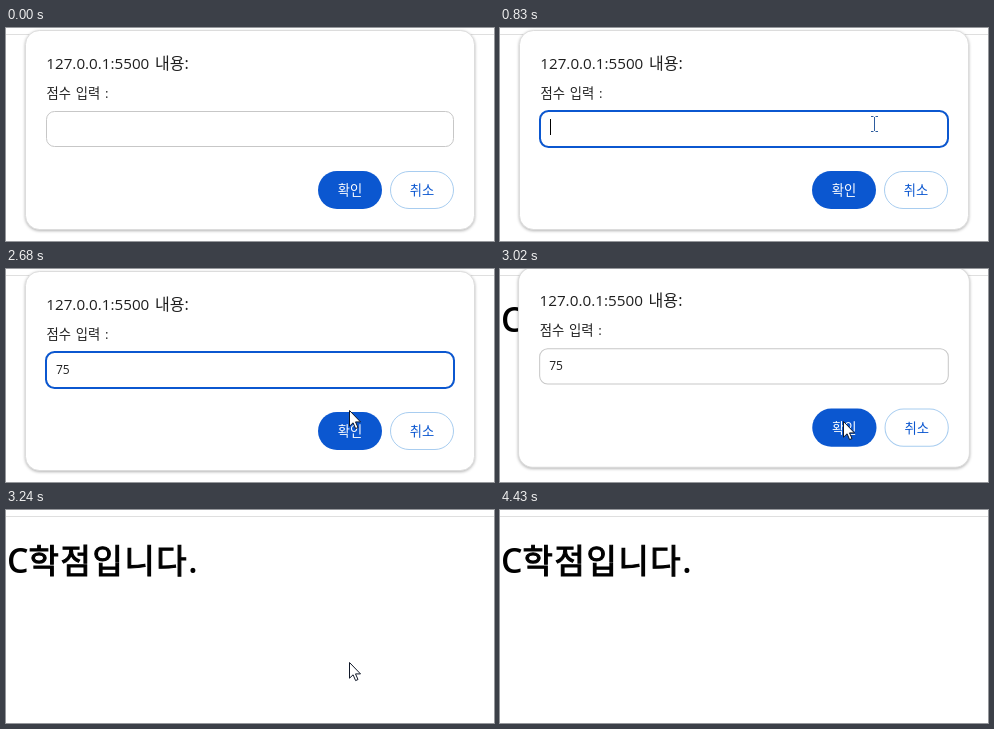
Animation, 488 px wide and 213 px high, one loop 5160 ms. Source, as an HTML page:

```html
<!DOCTYPE html>
<html lang="ko">
<head>
<meta charset="utf-8">
<style>
  html, body { margin: 0; width: 100%; height: 100%; overflow: hidden; background: #fff; }
  svg { display: block; width: 488px; height: 213px; }
  text { font-family: "Noto Sans CJK KR", "Noto Sans CJK", "Noto Sans CJK JP", sans-serif; fill: #1f1f1f; white-space: pre; }
  .latin { font-family: "Open Sans", "Noto Sans", sans-serif; }
  .label { font-size: 13.3px; }
  .button { font-size: 13.3px; text-anchor: middle; }
  .panel { filter: drop-shadow(0 1px 1.5px rgba(0, 0, 0, .3)); }
  /* A thin outline gives the heading a semibold weight. */
  #result { font-size: 33px; letter-spacing: 1.6px; fill: #000; stroke: #000; stroke-width: 1.1px; }
  #result .latin { font-size: 34px; font-weight: 600; letter-spacing: 0; stroke: none; }
</style>
</head>
<body>
<svg viewBox="0 0 488 213">
  <rect width="488" height="213" fill="#fff"/>
  <path d="M0 6.5H488" stroke="#dfdfdf"/>
  <text id="result" y="63"><tspan class="latin" x="1">C</tspan><tspan x="22.5">학점입니다</tspan><tspan class="latin">.</tspan></text>

  <g id="dialog">
    <rect class="panel" x="19.5" y="2.5" width="449" height="199" rx="14" fill="#fff" stroke="#dcdcdc"/>
    <text class="latin" x="40.3" y="41" font-size="15.2">127.0.0.1:5500</text>
    <text x="149" y="41" font-size="16">내용<tspan class="latin">:</tspan></text>
    <text class="label" x="40.5" y="70" word-spacing="1">점수 입력 <tspan class="latin">:</tspan></text>

    <rect x="40.5" y="83.5" width="407" height="35" rx="8" fill="#fff" stroke="#c7c7c7"/>
    <rect id="ring" x="40" y="83" width="408" height="36" rx="8.5" fill="none" stroke="#0b57d0" stroke-width="2"/>
    <text id="value" class="latin" x="50" y="105" font-size="12"></text>
    <rect id="caret" y="91" width="1" height="16" fill="#000"/>

    <rect x="312" y="143" width="64" height="38" rx="19" fill="#0b57d0"/>
    <text class="button" x="344" y="167" font-weight="500" style="fill:#fff">확인</text>
    <rect x="384.5" y="143.5" width="63" height="37" rx="18.5" fill="#fff" stroke="#a8cdf0"/>
    <text class="button" x="416" y="167" style="fill:#0b57d0">취소</text>
  </g>

  <path id="arrow" d="M.5 .5V16.2L4.1 12.8L6.6 18.6L9 17.5L6.5 11.9H11.5Z" fill="#fff" stroke="#101828"/>
  <path id="beam" d="M-3 -7.5H-.5M1.5 -7.5H4M.5 -7V7M-3 7.5H-.5M1.5 7.5H4" fill="none" stroke="#2d5c9e"/>
</svg>
<script>
  const LOOP = 5160;
  const $ = id => document.getElementById(id);

  // Each track is a list of [start time, value], held until the next start.
  const pointer = [
    [0, null],
    [70, ["arrow", 443, 198]], [140, ["arrow", 429, 166]], [210, ["arrow", 405, 128]],
    [280, ["beam", 380, 98]], [350, ["beam", 373, 86]], [420, ["beam", 374, 96]],
    [2480, ["beam", 373, 97]], [2550, ["beam", 368, 104]], [2620, ["arrow", 354, 125]],
    [2680, ["arrow", 343, 141]], [2750, ["arrow", 343, 147]], [2820, ["arrow", 343, 150]],
    [2880, ["arrow", 343, 152]],
    [4100, ["arrow", 346, 155]], [4170, ["arrow", 360, 168]], [4240, ["arrow", 382, 182]],
    [4300, ["arrow", 408, 196]], [4370, ["arrow", 432, 207]], [4430, null]
  ];
  const ring = [[0, 0], [560, .4], [630, .8], [690, 1], [3020, 0]];
  const typed = [[0, ""], [1420, "7"], [1950, "75"]];
  const caret = [[0, 0], [630, 1], [1160, 0], [1420, 1], [2480, 0]];
  const fade = [[0, 1], [3100, .6], [3170, .25], [3240, 0]];

  const at = (track, t) => track.findLast(step => step[0] <= t)[1];

  function draw(t) {
    const p = at(pointer, t);
    for (const id of ["arrow", "beam"]) {
      const on = p && p[0] === id;
      $(id).style.display = on ? "" : "none";
      if (on) $(id).setAttribute("transform", `translate(${p[1]} ${p[2]})`);
    }
    const text = at(typed, t);
    $("value").textContent = text;
    $("caret").setAttribute("x", 50 + text.length * 7);
    $("caret").style.opacity = at(caret, t);
    $("ring").style.opacity = at(ring, t);

    const closing = t >= 3020;
    $("result").style.display = closing ? "" : "none";
    $("dialog").style.opacity = at(fade, t);
    $("dialog").setAttribute("transform", closing ? "translate(-1 -4) scale(1.004)" : "");
  }

  const start = performance.now();
  function tick() {
    draw((performance.now() - start) % LOOP);
    requestAnimationFrame(tick);
  }
  tick();
</script>
</body>
</html>
```
